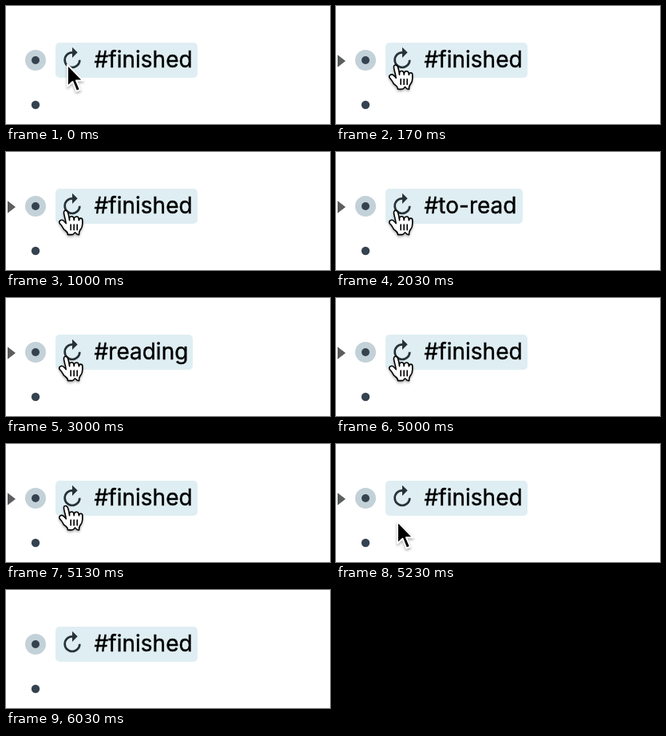
An HTML page for the animation above (6830 ms loop, 406 by 148 pixels).

```html
<!DOCTYPE html>
<html lang="en">
<head>
<meta charset="utf-8">
<title>Tag cycling</title>
<style>
  html, body { margin: 0; width: 100%; height: 100%; overflow: hidden; background: #fff; }
  svg { display: block; width: 406px; height: 148px; }
  text { font: 28px Inter, sans-serif; fill: #000; stroke: #000; stroke-width: .4px; }
  #cursor { filter: drop-shadow(0 2px 1.5px rgba(0, 0, 0, .3)); stroke-linejoin: round; stroke-linecap: round; }
</style>
</head>
<body>
<svg viewBox="0 0 406 148">
  <path id="fold" d="M2 61.3L12 69L2 76.7Z" fill="#5b5d5f"/>
  <circle cx="37" cy="68" r="13" fill="#c3d1d8"/>
  <g fill="#35424f">
    <circle cx="37" cy="68" r="5"/>
    <circle cx="37" cy="124" r="5.2"/>
  </g>
  <rect id="pill" x="62" y="46" width="178" height="44" rx="5" fill="#dfeef3"/>
  <path transform="translate(67 50.3) scale(1.333)" fill="#263238"
    d="M12 5V1L17 6L12 11V7A6 6 0 1 0 18 13H20A8 8 0 1 1 12 5Z"/>
  <text id="label" x="110.6" y="77"></text>
  <g id="cursor">
    <path id="arrow" d="M77 73.5V101L83.5 95L88.3 107L93 105L88 93.5H96.5Z" fill="#000" stroke="#fff" stroke-width="2"/>
    <g id="hand" transform="translate(50 56.4) scale(2)" fill="#fff" stroke="#000" stroke-width=".8">
      <path d="M11.3 20.4C11 20 10.7 19.3 10.1 18.4C9.8 17.9 8.9 16.9 8.6 16.5C8 15.5 8.8 14.4 9.9 14.4
        C10.9 14.4 11.8 15.5 12.6 16.6C12.4 14.6 11.8 13 11.5 11.4C11.2 10.2 11 9.1 11.6 8.7
        C12.2 8.2 13.3 8.4 13.8 9.8C14.3 11.2 14.6 13 14.8 14.6C14.7 13.2 14.8 12.4 15.5 12.3
        C17 11.9 17.5 12.6 17.6 14.5C17.7 13 17.9 12.5 18.6 12.4C20.2 12 20.5 12.8 20.7 14.6
        C20.9 13 22.8 12.9 22.9 14.5V16.8C22.9 19.5 22 19.9 21.4 20.8C20.8 21.7 20.6 22 20.8 23.6
        C19.5 23.8 19.2 23.4 18.6 22.5C18.4 22.2 18.1 22.2 17.9 22.5C17 23.9 16.8 23.6 13.7 23.6
        C13.9 22 13.2 22 11.3 20.4Z"/>
      <path d="M15.6 17.3V20.7M17.6 17.3V20.7M19.6 17.3V20.7" fill="none"/>
    </g>
  </g>
</svg>
<script>
  const LOOP = 6830, ENTER = 30, LEAVE = 4970, GONE = 5330;
  const el = id => document.getElementById(id);
  const show = (id, on) => el(id).style.display = on ? '' : 'none';
  const progress = (t, from, to) => Math.min(1, Math.max(0, (t - from) / (to - from)));

  // Each entry: start time, tag, pill width
  const tags = [
    [0, '#finished', 178],
    [1400, '#to-read', 172],
    [2670, '#reading', 172],
    [4000, '#finished', 178]
  ];

  function cursorOffset(t) {
    if (t < ENTER) return 0;
    if (t < LEAVE) return 3 * (1 - progress(t, ENTER, 300)) ** 2;
    return 76 * progress(t, LEAVE, GONE) ** 3.57;
  }

  function draw(now) {
    const t = now % LOOP;
    const [, tag, width] = tags.findLast(([start]) => t >= start);
    const dy = cursorOffset(t);
    const overPill = t >= ENTER && dy < 17;

    if (el('label').textContent !== tag) el('label').textContent = tag;
    el('pill').setAttribute('width', width);
    el('cursor').setAttribute('transform', `translate(0 ${dy})`);
    show('cursor', t < GONE);
    show('hand', overPill);
    show('arrow', !overPill);
    show('fold', t >= ENTER && dy < 24);
  }

  let origin;
  function frame(now) {
    origin ??= now;
    draw(now - origin);
    requestAnimationFrame(frame);
  }
  draw(0);
  requestAnimationFrame(frame);
</script>
</body>
</html>
```
